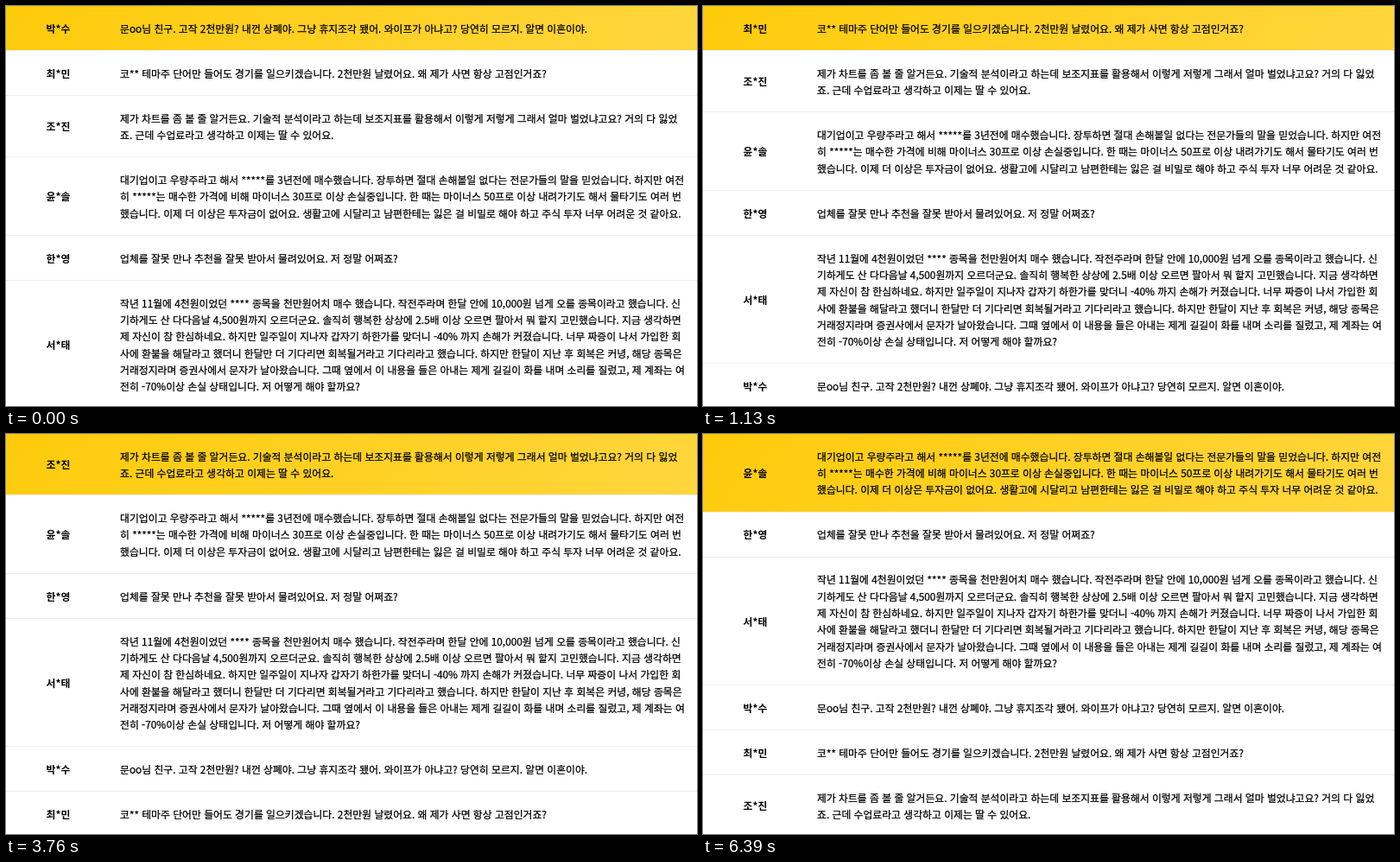
These frames come from a looping animation (800x463 px, 8000 ms). An HTML page:

```html
<!DOCTYPE html>
<html lang="ko">
<head>
<meta charset="utf-8">
<style>
html, body { margin: 0; width: 100%; height: 100%; overflow: hidden; background: #fff; }
#list {
  display: flex; flex-direction: column; width: 800px;
  font: 500 11.83px/19.3px "Noto Sans CJK KR", "Noto Sans KR", "Noto Sans CJK JP", "Noto Sans CJK", sans-serif;
  color: #000;
}
.row {
  flex: none; display: flex; align-items: center;
  padding: 15.85px 0; border-bottom: 1px solid #eee;
}
.row.first { background: linear-gradient(135deg, #fecb0a, #ffd63d); }
.row b { width: 121px; margin-right: 11px; text-align: center; font-weight: 700; }
/* a thin stroke gives the regular face a medium weight */
.row span { white-space: pre; -webkit-text-stroke: .25px; }
</style>
</head>
<body>
<div id="list"></div>
<script>
const posts = [
  ['박*수', '문oo님 친구. 고작 2천만원? 내껀 상폐야. 그냥 휴지조각 됐어. 와이프가 아냐고? 당연히 모르지. 알면 이혼이야.'],
  ['최*민', '코** 테마주 단어만 들어도 경기를 일으키겠습니다. 2천만원 날렸어요. 왜 제가 사면 항상 고점인거죠?'],
  ['조*진', `제가 차트를 좀 볼 줄 알거든요. 기술적 분석이라고 하는데 보조지표를 활용해서 이렇게 저렇게 그래서 얼마 벌었냐고요? 거의 다 잃었
죠. 근데 수업료라고 생각하고 이제는 딸 수 있어요.`],
  ['윤*솔', `대기업이고 우량주라고 해서 *****를 3년전에 매수했습니다. 장투하면 절대 손해볼일 없다는 전문가들의 말을 믿었습니다. 하지만 여전
히 *****는 매수한 가격에 비해 마이너스 30프로 이상 손실중입니다. 한 때는 마이너스 50프로 이상 내려가기도 해서 물타기도 여러 번
했습니다. 이제 더 이상은 투자금이 없어요. 생활고에 시달리고 남편한테는 잃은 걸 비밀로 해야 하고 주식 투자 너무 어려운 것 같아요.`],
  ['한*영', '업체를 잘못 만나 추천을 잘못 받아서 물려있어요. 저 정말 어쩌죠?'],
  ['서*태', `작년 11월에 4천원이었던 **** 종목을 천만원어치 매수 했습니다. 작전주라며 한달 안에 10,000원 넘게 오를 종목이라고 했습니다. 신
기하게도 산 다다음날 4,500원까지 오르더군요. 솔직히 행복한 상상에 2.5배 이상 오르면 팔아서 뭐 할지 고민했습니다. 지금 생각하면
제 자신이 참 한심하네요. 하지만 일주일이 지나자 갑자기 하한가를 맞더니 -40% 까지 손해가 커졌습니다. 너무 짜증이 나서 가입한 회
사에 환불을 해달라고 했더니 한달만 더 기다리면 회복될거라고 기다리라고 했습니다. 하지만 한달이 지난 후 회복은 커녕, 해당 종목은
거래정지라며 증권사에서 문자가 날아왔습니다. 그때 옆에서 이 내용을 들은 아내는 제게 길길이 화를 내며 소리를 질렀고, 제 계좌는 여
전히 -70%이상 손실 상태입니다. 저 어떻게 해야 할까요?`],
];

const LOOP = 8000, START = 500, PERIOD = 2630, STEP = 70, HALF = 5;
const list = document.getElementById('list');

const rows = posts.map(([name, text]) => {
  const row = document.createElement('div');
  const label = document.createElement('b');
  const body = document.createElement('span');
  label.textContent = name;
  body.textContent = text;
  row.append(label, body);
  list.append(row);
  return row;
});

// Fade out in five steps, move the top row to the end, fade back in.
function draw(time) {
  const t = time % LOOP - START;
  let shift = 0, step = 2 * HALF;
  if (t >= 0) {
    step = Math.min(step, 1 + Math.floor(t % PERIOD / STEP));
    shift = Math.floor(t / PERIOD) + (step >= HALF ? 1 : 0);
  }
  list.style.opacity = Math.abs(HALF - step) / HALF;
  rows.forEach((row, i) => {
    const place = (i - shift + rows.length) % rows.length;
    row.style.order = place;
    row.className = place ? 'row' : 'row first';
  });
}

let origin;
function tick(now) {
  origin ??= now;
  draw(now - origin);
  requestAnimationFrame(tick);
}
draw(0);
requestAnimationFrame(tick);
</script>
</body>
</html>
```
